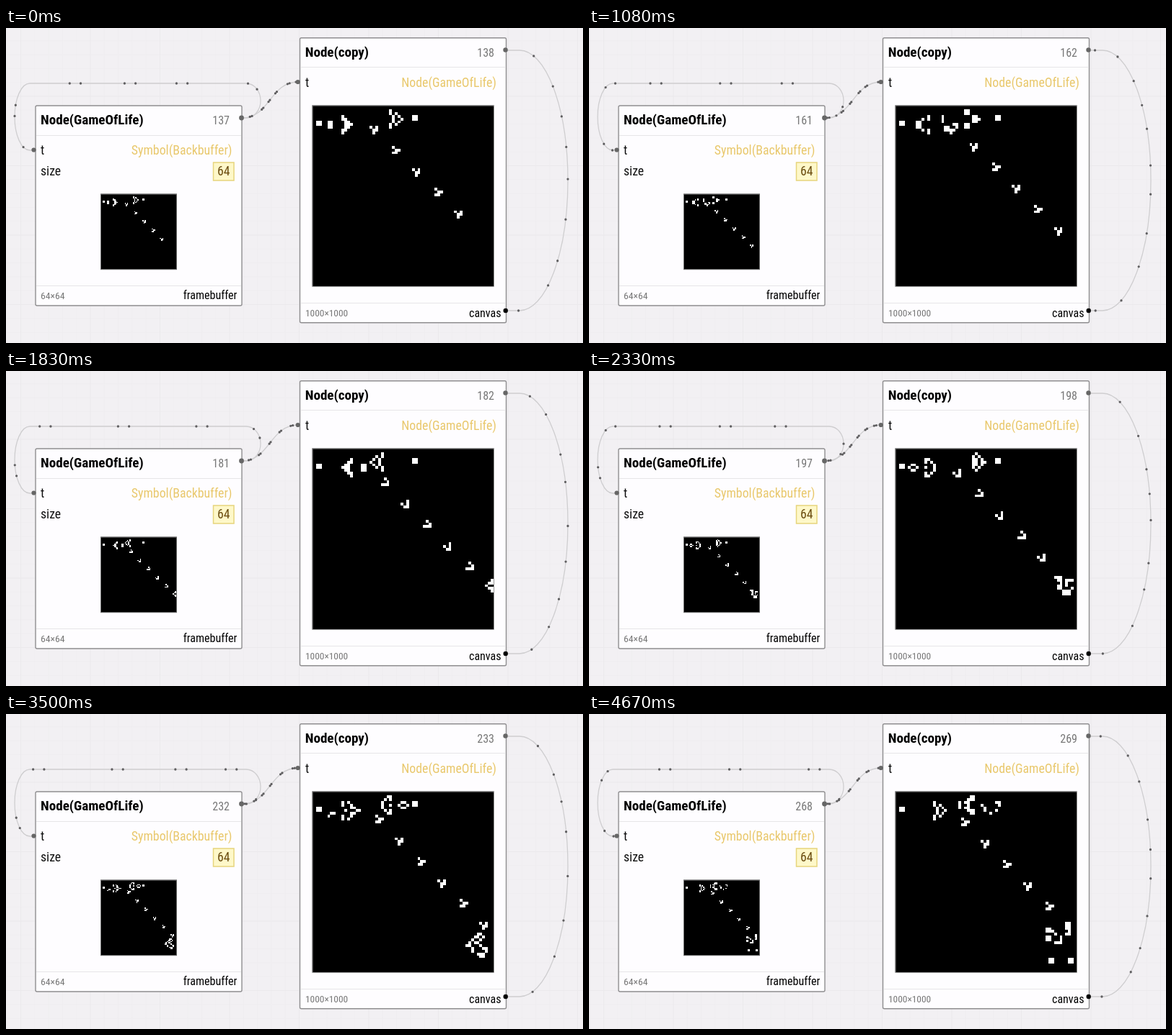
Write an HTML page with a canvas that moves like this. It is 800 px wide and 438 px high and loops after 4760 ms.

```html
<!DOCTYPE html>
<html lang="en">
<head>
<meta charset="utf-8">
<title>Game of Life nodes</title>
<style>
  html, body { margin: 0; width: 100%; height: 100%; overflow: hidden; background: #f2f0f3; }
  svg, canvas { position: absolute; left: 0; top: 0; }
  canvas { image-rendering: pixelated; background: #000; }
  #big { left: 425.5px; top: 108.5px; width: 250px; height: 250px; }
  #mini { left: 132.25px; top: 231.5px; width: 103.5px; height: 103.5px; }
  text { font-family: "Roboto Condensed", Roboto, sans-serif; font-stretch: 75%; }
  .wire { fill: none; stroke: #cfced0; stroke-width: 1.3; }
  .box { fill: #fefdff; stroke: #8f8e90; stroke-width: 1.4; }
  .rule { stroke: #e7e6e8; }
  .frame { fill: #000; stroke: #666; stroke-width: 1.4; }
</style>
</head>
<body>
<svg id="stage" width="800" height="438" viewBox="0 0 800 438">
  <defs>
    <pattern id="fine" x="20" y="-2" width="19.3" height="19.3" patternUnits="userSpaceOnUse">
      <path d="M0 .5H19.3M.5 0V19.3" stroke="#efedf0" fill="none"/>
    </pattern>
    <pattern id="coarse" x="20" y="-2" width="96.5" height="96.5" patternUnits="userSpaceOnUse">
      <path d="M0 .5H96.5M.5 0V96.5" stroke="#ebe9ec" fill="none"/>
    </pattern>
  </defs>
  <rect width="800" height="438" fill="url(#fine)"/>
  <rect width="800" height="438" fill="url(#coarse)"/>
  <path class="wire" id="self" d="M327 125H333A20 24 0 0 0 333 77H33A21 46.5 0 0 0 33 170H38"/>
  <path class="wire" id="link" d="M327 125C366 125 366 75 405 75"/>
  <path class="wire" id="loop" d="M693 393H712A67 181 0 0 0 712 31H693"/>
  <path id="dots" fill="none" stroke="#5f5e60" stroke-width="3.3" stroke-linecap="round"/>
  <rect class="box" x="41" y="108" width="286" height="278" rx="2"/>
  <rect class="box" x="407.5" y="13.8" width="286" height="396" rx="2"/>
  <path class="rule" d="M42 149.5H326M42 358.5H326M408 54.5H693M408 382.5H693"/>
  <rect x="287.5" y="187" width="28.5" height="25" fill="#fef8c9" stroke="#e6d57c" stroke-width="1.5"/>
  <rect class="frame" x="131.75" y="231" width="104.5" height="104.5"/>
  <rect class="frame" x="425" y="108" width="251" height="251"/>
  <g fill="#666">
    <circle cx="326.5" cy="125" r="3.4"/>
    <circle cx="38.5" cy="169.5" r="3.1"/>
    <circle cx="404.7" cy="75" r="3.1"/>
    <circle cx="692.5" cy="30.5" r="3.2"/>
    <circle cx="692.7" cy="393" r="3.2" fill="#000"/>
  </g>
</svg>
<canvas id="big" width="64" height="64"></canvas>
<canvas id="mini" width="64" height="64"></canvas>
<script>
const $ = id => document.getElementById(id);
const SIZE = 64, LOOP = 4760, LAST_TICK = 56;

// ---- labels ----
function addText(str, x, y, size, fill = '#111', weight = 400, anchor = 'start') {
  const el = document.createElementNS('http://www.w3.org/2000/svg', 'text');
  const attrs = { x, y, 'font-size': size, fill, 'font-weight': weight, 'text-anchor': anchor };
  for (const key in attrs) el.setAttribute(key, attrs[key]);
  el.textContent = str;
  $('stage').append(el);
  return el;
}

const GOLD = '#e9c86c', GREY = '#777';
addText('Node(GameOfLife)', 48, 134, 19.1, '#000', 700);
addText('t', 48, 176, 17.7);
addText('Symbol(Backbuffer)', 313.5, 176, 17.8, GOLD, 400, 'end');
addText('size', 48, 205, 17.7);
addText('64', 301.7, 205, 17.7, '#6b4d10', 400, 'middle');
addText('64×64', 48, 377, 13.7, GREY);
addText('framebuffer', 320.5, 377, 16, '#000', 400, 'end');
addText('Node(copy)', 414.7, 40, 19.1, '#000', 700);
addText('t', 415, 82, 17.7);
addText('Node(GameOfLife)', 680, 82, 17.8, GOLD, 400, 'end');
addText('1000×1000', 415, 401, 13.4, GREY);
addText('canvas', 686.5, 402, 16, '#000', 400, 'end');
const lifeCount = addText('', 310, 134, 16, GREY, 400, 'end');
const copyCount = addText('', 677, 40, 16, GREY, 400, 'end');

// ---- Game of Life: a glider gun on a board whose edges repeat outward ----
const GUN = '24bo$22bobo$12b2o6b2o12b2o$11bo3bo4b2o12b2o$2o8bo5bo3b2o$' +
  '2o8bo3bob2o4bobo$10bo5bo7bo$11bo3bo$12b2o';

function seedBoard() {
  const board = new Uint8Array(SIZE * SIZE);
  GUN.split('$').forEach((row, y) => {
    let x = 1;
    for (const [, n, kind] of row.matchAll(/(\d*)([bo])/g))
      for (let k = +n || 1; k--; x++)
        if (kind === 'o') board[(y + 1) * SIZE + x] = 1;
  });
  return board;
}

const clamp = v => Math.max(0, Math.min(SIZE - 1, v));

function step(board) {
  return board.map((alive, i) => {
    const x = i % SIZE, y = (i - x) / SIZE;
    let sum = 0;
    for (let dy = -1; dy < 2; dy++)
      for (let dx = -1; dx < 2; dx++)
        sum += board[clamp(y + dy) * SIZE + clamp(x + dx)];
    return sum === 3 || (alive && sum === 4) ? 1 : 0;
  });
}

const boards = [seedBoard()];
while (boards.length < 270) boards.push(step(boards[boards.length - 1]));

function drawBoard(id, generation) {
  const ctx = $(id).getContext('2d');
  ctx.fillStyle = '#000';
  ctx.fillRect(0, 0, SIZE, SIZE);
  ctx.fillStyle = '#fff';
  boards[generation].forEach((alive, i) => {
    if (alive) ctx.fillRect(i % SIZE, Math.floor(i / SIZE), 1, 1);
  });
}

// ---- pacing: the evaluation rate drifts, and the board trails the counter ----
const PACE = [
  { tick: 0, count: 138, generation: 136 },
  { tick: 13, count: 162, generation: 160 },
  { tick: 22, count: 182, generation: 181 },
  { tick: 33, count: 212, generation: 211 },
  { tick: 42, count: 233, generation: 232 },
  { tick: 49, count: 252, generation: 250 },
  { tick: LAST_TICK, count: 269, generation: 266 }
];

function paceAt(tick, key) {
  const i = Math.max(1, PACE.findIndex(p => p.tick >= tick));
  const a = PACE[i - 1], b = PACE[i];
  return Math.round(a[key] + (tick - a.tick) / (b.tick - a.tick) * (b[key] - a[key]));
}

// ---- pulses: each crosses its wire in TRAVEL ticks, whatever the length ----
const TRAVEL = 4.5;
let seed = 7;
const random = () => (seed = seed * 16807 % 2147483647) / 2147483647;

function startTimes(gap, burst) {
  const starts = [];
  for (let t = -TRAVEL; t < LAST_TICK; t += gap * (0.7 + 0.6 * random()))
    for (let k = 0; k < burst; k++) starts.push(t + k * 0.14);
  return starts;
}

const lifeStarts = startTimes(0.8, 2), copyStarts = startTimes(0.48, 1);
const wires = [['self', lifeStarts], ['link', lifeStarts], ['loop', copyStarts]]
  .map(([id, starts]) => ({ path: $(id), length: $(id).getTotalLength(), starts }));

function drawDots(tick) {
  let d = '';
  for (const { path, length, starts } of wires)
    for (const start of starts) {
      const u = (tick - start) / TRAVEL;
      if (u < 0 || u > 1) continue;
      const p = path.getPointAtLength(u * length);
      d += `M${p.x.toFixed(2)} ${p.y.toFixed(2)}h.01`;
    }
  $('dots').setAttribute('d', d);
}

// ---- playback: 12 ticks a second, each starting on a whole 10 ms ----
let shown = -1;
function render() {
  const t = Math.floor(performance.now() % LOOP / 10) * 10;
  const tick = Math.min(LAST_TICK, Math.floor((t + 5) * 0.012));
  if (tick !== shown) {
    shown = tick;
    const count = paceAt(tick, 'count'), generation = paceAt(tick, 'generation');
    copyCount.textContent = count;
    lifeCount.textContent = count - 1;
    drawBoard('big', generation);
    drawBoard('mini', generation);
    drawDots(tick);
  }
  requestAnimationFrame(render);
}
render();
</script>
</body>
</html>
```
